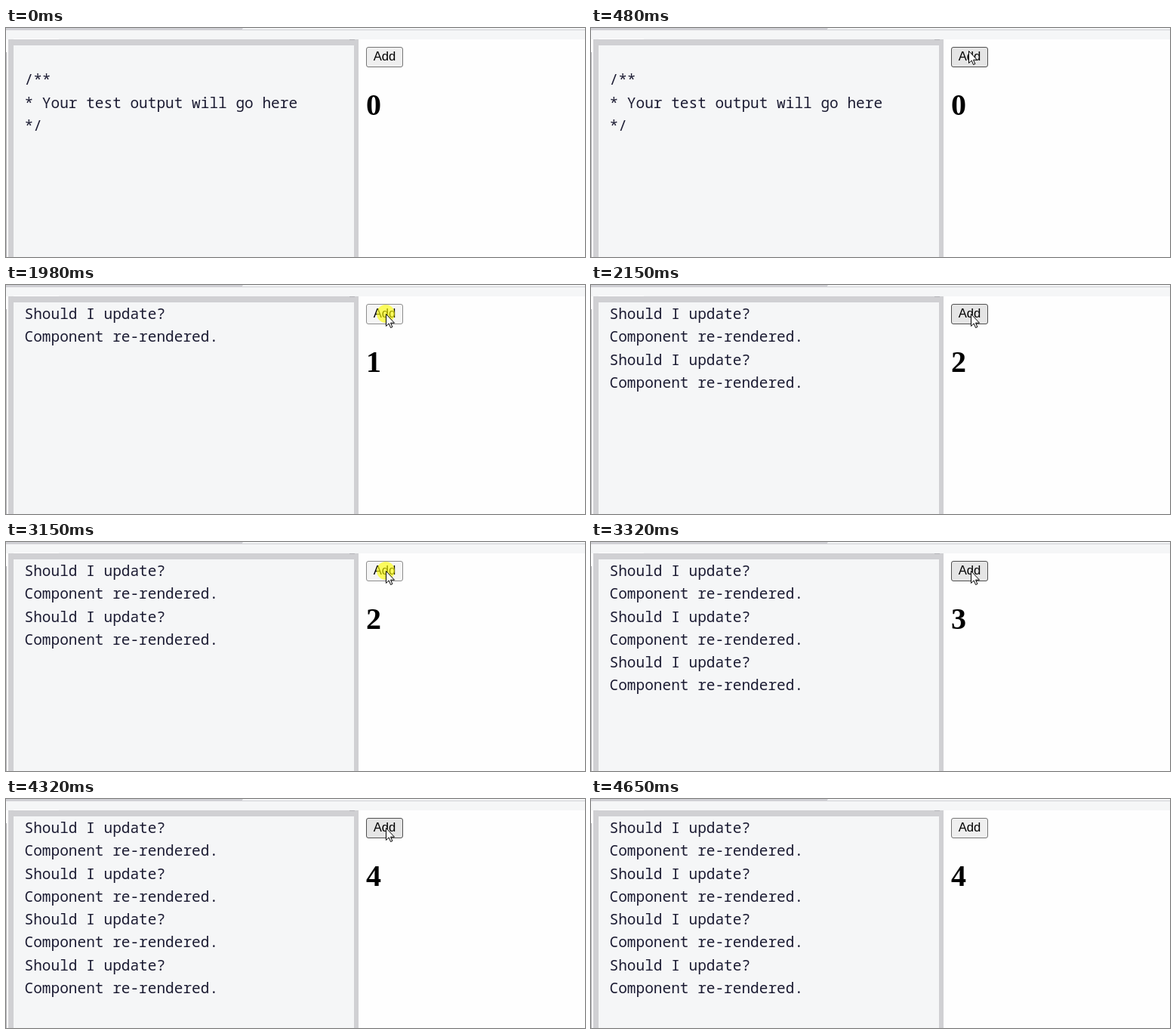
Write an HTML page that moves like this. It is 767 px wide and 303 px high and loops after 5.82 s.

```html
<!DOCTYPE html>
<html lang="en">
<head>
<meta charset="utf-8">
<title>Counter and console</title>
<style>
  html, body { margin: 0; width: 100%; height: 100%; overflow: hidden; background: #f5f6f7; }
  svg { display: block; }
  text { white-space: pre; }
  #log { font: 19.45px "Noto Sans Mono", monospace; fill: #1b1b32; }
  #label { font: 16.67px "Liberation Sans", Arial, sans-serif; }
  #count { font: bold 40px "Liberation Serif", Times, serif; }
</style>
</head>
<body>
<svg width="767" height="303" viewBox="0 0 767 303">
  <path fill="#d0d0d5" d="M0 0H314L312 3H0ZM312 2H767V3H312Z"/>
  <path fill="#fefefe" d="M467 15H767V303H467ZM0 15H3V303H0ZM10 14H70V16H10Z"/>
  <path fill="#d0d0d3" d="M3 15H467V303H461V23H10V303H3Z"/>
  <path fill="#b4b4b8" d="M0 32H1V303H0ZM455 15H462V16H455Z"/>
  <g id="log"></g>
  <rect id="button" x="477.5" y="25.5" width="48" height="26" rx="2.5"/>
  <text id="label" x="486.7" y="43">Add</text>
  <text id="count" x="477" y="115"></text>
  <circle id="press" cx="503" cy="38" r="12" fill="#ff0" fill-opacity=".62"/>
  <path id="cursor" d="M.5 .5V16.5L4.2 13L6.6 18.5L8.9 17.5L6.5 12.2H11.5Z" fill="#fff" stroke="#000"/>
</svg>
<script>
const LOOP = 5820;
const $ = id => document.getElementById(id);
const intro = ["", "/**", "* Your test output will go here", "*/"];
const render = ["Should I update?", "Component re-rendered."];

// Button fill and border
const looks = {
  idle: ["#efefef", "#767676"],
  hover: ["#e5e5e5", "#4f4f4f"],
  active: ["#f5f5f5", "#8d8d8d"]
};

// Start time, count, button look, cursor position
const steps = [
  [0, 0, "idle"],
  [170, 0, "idle", 520, 46],
  [310, 0, "hover", 505, 32],
  [480, 0, "hover", 500, 30],
  [820, 1, "hover", 500, 35],
  [980, 1, "hover", 503, 38],
  [1980, 1, "active", 503, 38],
  [2150, 2, "hover", 503, 38],
  [3150, 2, "active", 503, 38],
  [3320, 3, "hover", 503, 38],
  [4150, 3, "active", 503, 38],
  [4320, 4, "hover", 503, 38],
  [4490, 4, "idle", 728, 287],
  [4650, 4, "idle"]
];

function show([, count, look, x, y]) {
  const lines = count ? Array(count).fill(render).flat() : intro;
  $("log").innerHTML = lines
    .map((line, i) => `<text x="24.5" y="${45 + 30.25 * i}">${line}</text>`)
    .join("");
  $("count").textContent = count;
  const [fill, border] = looks[look];
  $("button").setAttribute("fill", fill);
  $("button").setAttribute("stroke", border);
  $("press").style.display = look === "active" ? "" : "none";
  $("cursor").style.display = x === undefined ? "none" : "";
  $("cursor").setAttribute("transform", `translate(${x ?? 0} ${y ?? 0})`);
}

let current;
function tick() {
  const time = performance.now() % LOOP;
  const step = steps.filter(s => s[0] <= time).pop();
  if (step !== current) show(current = step);
  requestAnimationFrame(tick);
}
tick();
</script>
</body>
</html>
```
